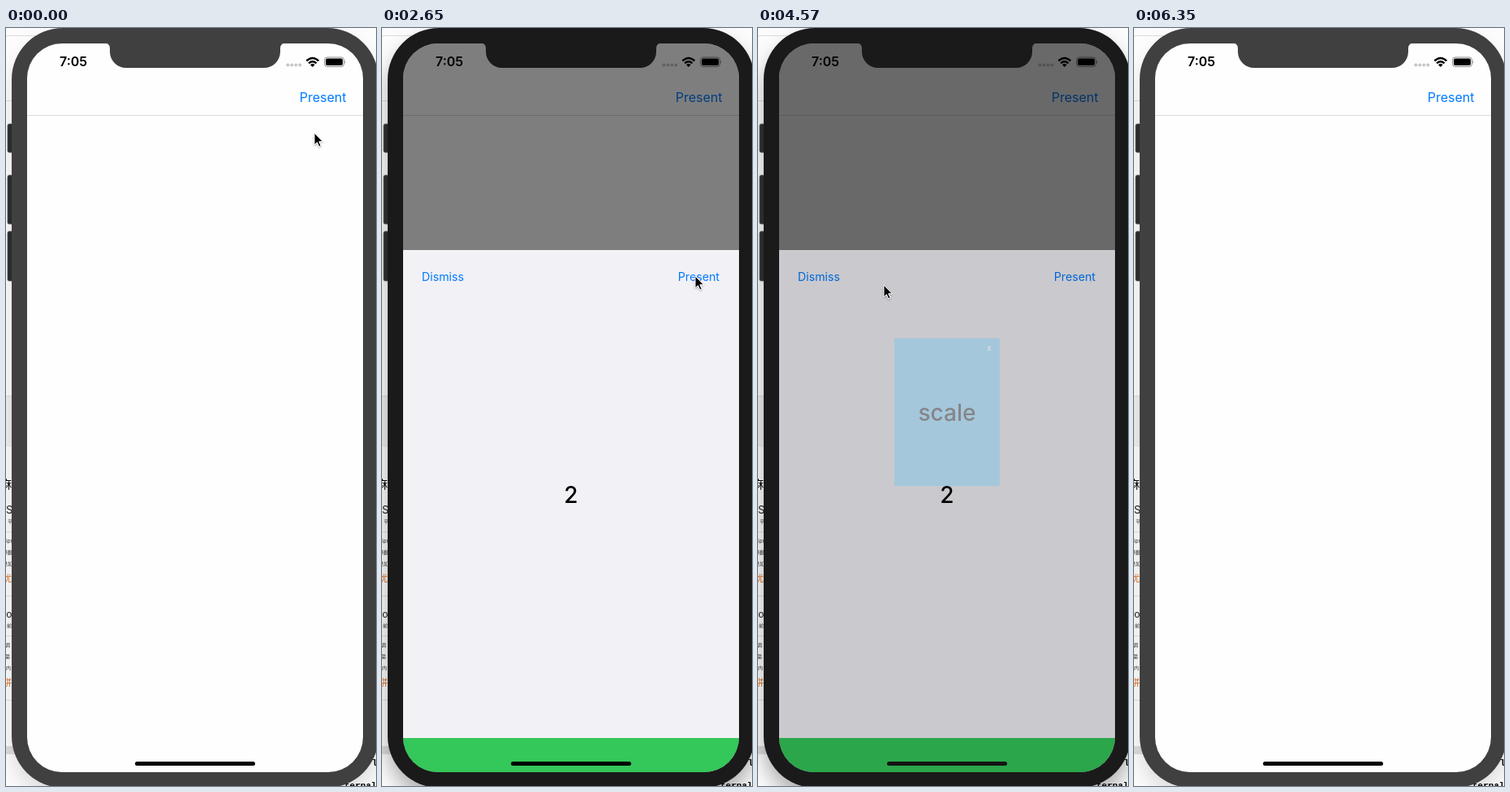
These frames come from a looping animation (456 by 932 pixels, 6450 ms). An HTML page:

```html
<!DOCTYPE html>
<html lang="en">
<head>
<meta charset="utf-8">
<title>Sheet and popup presentation</title>
<style>
  html, body { margin: 0; width: 100%; height: 100%; overflow: hidden; background: #fff; }
  svg { display: block; width: 456px; height: 932px; font-family: Inter, "Open Sans", sans-serif; }
  .cjk { font-family: "Noto Sans CJK SC", "Noto Sans CJK", "Noto Sans CJK JP", sans-serif; }
  .link { fill: #007aff; }
  .tiny { font-size: 6px; fill: #333; }
  .orange { font-size: 11px; fill: #e0691a; }
  .code { font: bold 11px "Liberation Mono", monospace; }
  .big { font-size: 28px; font-weight: 450; text-anchor: middle; }
  .rules { stroke: #ddd; }
</style>
</head>
<body>
<svg viewBox="0 0 456 932">
  <defs>
    <clipPath id="screenClip"><rect x="26" y="19" width="414" height="896" rx="43"/></clipPath>
    <filter id="blur" x="-20%" y="-20%" width="140%" height="140%"><feGaussianBlur stdDeviation="12"/></filter>
    <filter id="soft" x="-50%" y="-50%" width="200%" height="200%"><feDropShadow dx="0" dy="1" stdDeviation="1" flood-opacity=".35"/></filter>
  </defs>

  <!-- windows behind the phone -->
  <rect width="456" height="932" fill="#fcfcfc"/>
  <rect y="452" width="30" height="63" fill="#efefef"/>
  <rect y="883" width="60" height="9" fill="#ddd"/>
  <path class="rules" d="M0 9.5H70M0 89.5H30M0 452.5H30M0 619.5H30M0 698.5H30M0 747.5H30M0 826.5H30M0 883.5H50M0 892.5H60"/>
  <g class="cjk">
    <text x="-7" y="566" font-size="14">麻</text>
    <g class="tiny">
      <text x="2" y="609">平</text><text x="2" y="647">翻</text><text x="2" y="661">如</text>
      <text x="-4" y="647">译</text><text x="-4" y="661">果</text>
      <text x="1" y="737">前</text><text x="-1" y="761">调</text>
      <text x="-1" y="775">第</text><text x="0" y="789">内</text>
    </g>
    <g class="orange"><text x="-4" y="681">优</text><text x="-4" y="809">拼</text></g>
  </g>
  <g fill="#222">
    <text x="0" y="597" font-size="13">S</text>
    <text x="-2" y="633" class="tiny">Spr</text>
    <text x="-4" y="725" font-size="12">ro</text>
  </g>
  <g class="code"><text x="451" y="907">l</text><text x="417" y="935">ternal</text></g>

  <!-- phone body -->
  <rect id="shadow" x="7" y="14" width="452" height="934" rx="63" filter="url(#blur)"/>
  <g fill="#292b2c" stroke="#555" stroke-width=".8">
    <rect x="2" y="118" width="9" height="35" rx="2"/>
    <rect x="2" y="181" width="9" height="60" rx="2"/>
    <rect x="2" y="250" width="9" height="61" rx="2"/>
  </g>
  <rect class="bezel" x="7" y="0" width="452" height="934" rx="63"/>

  <g clip-path="url(#screenClip)">
    <rect x="26" y="19" width="414" height="896" fill="#fefefe"/>
    <path d="M26 107.5H440" stroke="#dcdcdc"/>
    <text class="link" x="419.5" y="91" font-size="16" text-anchor="end">Present</text>
    <rect id="sheetDim" x="26" y="19" width="414" height="896"/>

    <g id="sheet">
      <rect x="26" width="414" height="600" fill="#f2f1f6"/>
      <rect x="26" y="600" width="414" height="60" fill="#34c759"/>
      <g class="link" font-size="14.2">
        <text x="49" y="37.5">Dismiss</text>
        <text x="416" y="37.5" text-anchor="end">Present</text>
      </g>
      <text class="big" x="233" y="310.5">2</text>
    </g>

    <rect id="popupDim" x="26" y="19" width="414" height="896"/>
    <g id="popup">
      <g id="card">
        <rect x="-150" y="-210" width="300" height="420" fill="#5ac5f9"/>
        <text x="120" y="-174" font-size="17" font-weight="700" fill="#fff" text-anchor="middle">X</text>
      </g>
      <text class="big" x="233" y="483">scale</text>
    </g>

    <!-- status bar -->
    <text x="66" y="47" font-size="16" font-weight="600">7:05</text>
    <g fill-opacity=".22">
      <circle cx="347.3" cy="45.5" r="2"/><circle cx="352.3" cy="45.5" r="2"/>
      <circle cx="357.3" cy="45.5" r="2"/><circle cx="362.3" cy="45.5" r="2"/>
    </g>
    <g fill="none" stroke="#000" stroke-width="2.4">
      <path d="M370.3 40.4Q377.8 33.5 385.3 40.4M373.1 43.4Q377.8 39.3 382.5 43.4"/>
    </g>
    <path d="M377.8 48L375 45.2Q377.8 43 380.6 45.2Z"/>
    <rect x="392.5" y="36" width="24" height="11.5" rx="3.4" fill="none" stroke="#000" stroke-opacity=".45"/>
    <rect x="394" y="37.5" width="21" height="8.5" rx="2"/>
    <path d="M417.6 39.8Q419.4 41.8 417.6 43.8Z" fill-opacity=".5"/>
    <rect id="home" x="159" y="902" width="148" height="5" rx="2.5"/>
  </g>
  <path class="bezel" d="M122 18.5Q128 19 128 25V29A20 20 0 0 0 148 49H318A20 20 0 0 0 338 29V25Q338 19 344 18.5Z"/>

  <path id="cursor" d="M0 0V14.8L3.4 11.6L5.9 17L8.2 16L5.8 10.7H10.4Z" stroke="#fff" stroke-width="1" filter="url(#soft)"/>
</svg>

<script>
const LOOP = 6450;
const STEP = 147.5;
const TRANSITION = 330;
const el = id => document.getElementById(id);
const bezels = document.querySelectorAll('.bezel');

// time, x, y of the pointer tip
const pointerPath = [
  [0, 380, 129], [850, 397, 83], [1330, 397, 83], [2360, 386, 300],
  [2655, 386, 305], [3400, 386, 305], [4050, 352, 290], [4300, 352, 290],
  [4570, 155, 316], [5050, 78, 304], [5300, 78, 306], [5605, 416, 644], [5740, 540, 790]
];

const ease = u => {
  u = Math.min(1, Math.max(0, u));
  return u * u * (3 - 2 * u);
};
const shown = (t, open, close) =>
  ease((t - open) / TRANSITION) - ease((t - close) / TRANSITION);

function pointerAt(t) {
  const i = pointerPath.findIndex(p => p[0] > t);
  if (i < 0) return pointerPath.at(-1).slice(1);
  const [t0, x0, y0] = pointerPath[i - 1], [t1, x1, y1] = pointerPath[i];
  const k = ease((t - t0) / (t1 - t0));
  return [x0 + (x1 - x0) * k, y0 + (y1 - y0) * k];
}

function draw(t) {
  const active = t > 880 && t < 6300;
  bezels.forEach(b => b.setAttribute('fill', active ? '#1a1a1a' : '#404040'));
  el('shadow').setAttribute('opacity', active ? .3 : .12);

  const sheet = shown(t, 1015, 5361);
  el('sheet').setAttribute('transform', `translate(0 ${915 - 642 * sheet})`);
  el('sheetDim').setAttribute('opacity', sheet / 2);

  const popup = shown(t, 3085, 4370);
  el('popup').setAttribute('opacity', popup);
  el('popupDim').setAttribute('opacity', popup / 2);
  el('card').setAttribute('transform', `translate(233 472.3) scale(${.15 + .85 * popup})`);
  const gray = 60 * popup;
  el('home').setAttribute('fill', `rgb(${gray},${gray},${gray})`);

  el('cursor').setAttribute('transform', `translate(${pointerAt(t)})`);
}

const start = performance.now();
function tick() {
  const t = (performance.now() - start) % LOOP;
  draw(Math.floor((t + 8) / STEP) * STEP);
  requestAnimationFrame(tick);
}
tick();
</script>
</body>
</html>
```
